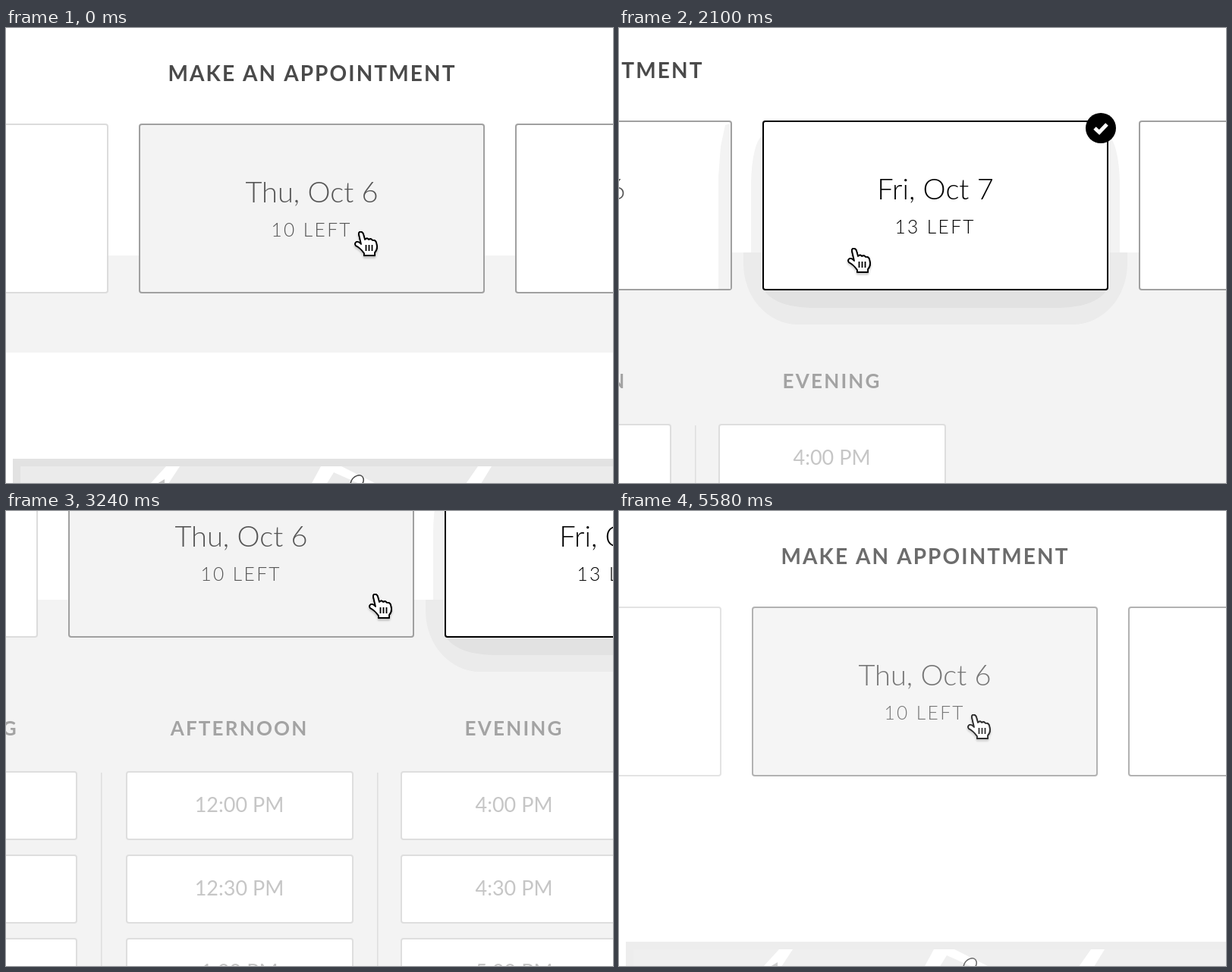
Write an HTML page with a canvas that moves like this. It is 800 px wide and 600 px high and loops after 5.64 s.

```html
<!DOCTYPE html>
<html lang="en">
<head>
<meta charset="utf-8">
<title>Make an appointment</title>
<style>
  html, body { margin: 0; width: 100%; height: 100%; overflow: hidden; background: #fff; }
  canvas { display: block; width: 800px; height: 600px; }
</style>
</head>
<body>
<canvas id="stage" width="800" height="600"></canvas>
<script>
const ctx = document.getElementById('stage').getContext('2d');
const LOOP = 5640, STEP = 60;
const CLICK = { open: 360, friday: 1560, thursday: 3420 };
const FADE_OUT = 4560, FADE_IN = 5280;

// Rows are time, x, y.
const CAMERA = [[540, 0, 0], [1260, 83, 0], [1860, 425, 0], [2100, 482, 4],
  [2580, 430, 37], [3240, 93, 183], [3900, 20.4, 213.5], [4620, 4, 226]];
const POINTER = [[420, 468, 269], [1260, 762, 295], [1500, 792, 295], [2640, 792, 295],
  [3240, 580, 293], [3420, 560, 292], [3900, 422, 423], [4320, 408, 570]];

const CARD = { y: 126, w: 456, h: 224 };
const COLUMNS = [
  { x: -113, title: 'MORNING', times: ['8:00 AM', '8:30 AM', '9:00 AM'] },
  { x: 251, title: 'AFTERNOON', times: ['12:00 PM', '12:30 PM', '1:00 PM'], open: [0, 2] },
  { x: 613, title: 'EVENING', times: ['4:00 PM', '4:30 PM', '5:00 PM'] }
];

const gray = n => { n = Math.round(n); return `rgb(${n},${n},${n})`; };
const clamp = v => Math.max(0, Math.min(1, v));
const mix = (a, b, p) => a + (b - a) * p;
const ramp = (t, start, length = 240) => clamp((t - start) / length);
const easeInOut = p => p < .5 ? 2 * p * p : 1 - 2 * (1 - p) * (1 - p);

// Monotone cubic interpolation of one column of a key table.
function curve(keys, col, t) {
  const last = keys.length - 1;
  if (t <= keys[0][0]) return keys[0][col];
  if (t >= keys[last][0]) return keys[last][col];
  const i = keys.findIndex(k => k[0] > t) - 1;
  const rate = j => (keys[j + 1][col] - keys[j][col]) / (keys[j + 1][0] - keys[j][0]);
  const slope = j => {
    if (j === 0 || j === last) return 0;
    const a = rate(j - 1), b = rate(j);
    return a * b > 0 ? 2 * a * b / (a + b) : 0;
  };
  const h = keys[i + 1][0] - keys[i][0], p = (t - keys[i][0]) / h;
  return mix(keys[i][col], keys[i + 1][col], p * p * (3 - 2 * p))
    + h * p * (1 - p) * ((1 - p) * slope(i) - p * slope(i + 1));
}

const inside = (p, x, y, w, h) => p.x >= x && p.x <= x + w && p.y >= y && p.y <= y + h;

function rect(x, y, w, h, fill) {
  ctx.fillStyle = fill;
  ctx.fillRect(x, y, w, h);
}

function rounded(x, y, w, h, r, fill) {
  ctx.beginPath();
  ctx.roundRect(x, y, w, h, r);
  ctx.fillStyle = fill;
  ctx.fill();
}

function box(x, y, w, h, fill, border) {
  rounded(x, y, w, h, 4, border);
  rounded(x + 2, y + 2, w - 4, h - 4, 2, fill);
}

function polygon(points, fill) {
  ctx.beginPath();
  points.forEach(([x, y]) => ctx.lineTo(x, y));
  ctx.closePath();
  ctx.fillStyle = fill;
  ctx.fill();
}

function label(text, x, y, size, color, weight = 400, tracking = 0) {
  ctx.font = `${weight} ${size}px Lato, sans-serif`;
  ctx.letterSpacing = tracking + 'px';
  ctx.textAlign = 'center';
  ctx.fillStyle = color;
  ctx.fillText(text, x + tracking / 2, y);
}

function clipped(y, h, draw) {
  ctx.save();
  ctx.beginPath();
  ctx.rect(-1000, y, 4000, h);
  ctx.clip();
  draw();
  ctx.restore();
}

function shadow(x, strength) {
  ctx.globalAlpha = strength;
  clipped(0, 300, () => rounded(x - 15, 146, 486, 300, { x: 17, y: 65 }, gray(243)));
  clipped(300, 300, () => {
    rounded(x - 25, 200, 506, 195, { x: 72, y: 80 }, gray(235));
    rounded(x, 250, 456, 123, { x: 64, y: 32 }, gray(226));
  });
  ctx.globalAlpha = 1;
}

function cardText(card, color) {
  const center = card.x + CARD.w / 2;
  label(card.day, center, 230, 38, color, 300);
  label(card.left, center - 1.5, 275, 24.5, color, 300, 2.4);
}

function drawCard(card, hover, selected) {
  box(card.x, CARD.y, CARD.w, CARD.h, gray(hover ? 243 : 255), gray(card.border));
  if (!card.day) return;
  if (card.edge > 0 && !hover) {
    ctx.globalAlpha = card.edge;
    polygon([[629, 130], [622, 132], [616, 160], [613, 200], [613, 348], [629, 348]], gray(243));
    ctx.globalAlpha = 1;
  }
  cardText(card, gray(86));
  if (selected <= 0) return;
  ctx.globalAlpha = selected;
  box(card.x, CARD.y, CARD.w, CARD.h, '#fff', '#000');
  cardText(card, '#000');
  const bx = card.x + 446, by = 136;
  ctx.beginPath();
  ctx.arc(bx, by, 20, 0, Math.PI * 2);
  ctx.fillStyle = '#000';
  ctx.fill();
  ctx.beginPath();
  ctx.moveTo(bx - 8, by);
  ctx.lineTo(bx - 2, by + 5.5);
  ctx.lineTo(bx + 8, by - 5);
  ctx.strokeStyle = '#fff';
  ctx.lineWidth = 5;
  ctx.stroke();
  ctx.globalAlpha = 1;
}

function drawTimes(pointer, availability) {
  let overButton = false;
  rect(218, 528, 1.5, 480, gray(222));
  rect(582, 528, 1.5, 480, gray(222));
  for (const column of COLUMNS) {
    const center = column.x + 150;
    label(column.title, center - 1.5, 479, 26, gray(163), 700, 2.2);
    column.times.forEach((time, row) => {
      const y = 526 + row * 110;
      const free = column.open && column.open.includes(row) ? availability : 0;
      const hover = free > .5 && inside(pointer, column.x, y, 300, 91);
      overButton = overButton || hover;
      box(column.x, y, 300, 91, gray(hover ? 243 : 255), gray(mix(222, 160, free)));
      label(time, center - .5, y + 54, 27, gray(mix(198, 96, free)));
    });
  }
  return overButton;
}

function drawMap(top, faded) {
  ctx.save();
  ctx.translate(0, top);
  rect(9, 0, 900, 400, gray(faded ? 233 : 226));
  rect(19, 10, 890, 390, gray(235));
  polygon([[211, 10], [229, 10], [214, 33], [190, 33]], '#fff');
  polygon([[209, 27], [209, 33], [199, 33]], gray(198));
  polygon([[415, 10], [442, 10], [490, 34], [468, 34], [432, 18], [422, 34], [402, 34]], '#fff');
  polygon([[622, 10], [640, 10], [626, 33], [606, 33]], '#fff');
  ctx.beginPath();
  ctx.moveTo(454, 33);
  ctx.bezierCurveTo(456, 22, 469, 18, 471, 26);
  ctx.quadraticCurveTo(472, 30, 469, 34);
  ctx.strokeStyle = gray(70);
  ctx.lineWidth = 1.5;
  ctx.stroke();
  ctx.restore();
}

const HAND = new Path2D('M6 4Q6 0 9 1Q11 1 12 4L14 11Q17 8 19 11Q22 9 24 12Q28 11 29 15'
  + 'L30 20Q30 25 27 28L27 32L13 32L13 29Q8 22 2 19Q0 16 3 14Q6 13 9 17Z');
const HAND_LINES = new Path2D('M15.5 18V26M19.5 18V26M23.5 18V26');
const ARROW = new Path2D('M1 1V27L7 21.5L11.5 32L15.5 30.5L11 20H18Z');

function drawPointer(p, hand) {
  ctx.save();
  ctx.translate(p.x - (hand ? 9 : 0), p.y - (hand ? 1 : 0));
  ctx.lineJoin = 'round';
  ctx.shadowColor = 'rgba(0,0,0,.35)';
  ctx.shadowBlur = 3;
  ctx.shadowOffsetY = 2;
  ctx.fillStyle = hand ? '#fff' : '#000';
  ctx.strokeStyle = hand ? '#000' : '#fff';
  ctx.lineWidth = hand ? 1.8 : 3.5;
  ctx.stroke(hand ? HAND : ARROW);
  ctx.shadowColor = 'transparent';
  ctx.fill(hand ? HAND : ARROW);
  if (hand) {
    ctx.stroke(HAND);
    ctx.stroke(HAND_LINES);
  }
  ctx.restore();
}

function drawScene(t, faded) {
  const toFriday = ramp(t, CLICK.friday), toThursday = ramp(t, CLICK.thursday);
  const thursday = ramp(t, CLICK.open) - toFriday + toThursday;
  const friday = toFriday - toThursday;
  const pointer = { x: curve(POINTER, 1, t), y: curve(POINTER, 2, t) };
  const panelBottom = 428 + 572 * easeInOut(ramp(t, CLICK.open, 480));
  const cards = [
    { x: -321, border: 220 },
    { x: 175, border: 160, day: 'Thu, Oct 6', left: '10 LEFT', selected: thursday, edge: friday },
    { x: 671, border: 160, day: 'Fri, Oct 7', left: '13 LEFT', selected: friday },
    { x: 1167, border: 160 }
  ];

  ctx.save();
  ctx.translate(-curve(CAMERA, 1, t), -curve(CAMERA, 2, t));
  if (!faded) rect(-1000, 300, 4000, panelBottom - 300, gray(243));
  drawMap(panelBottom + 140, faded);

  let hand = false;
  if (t >= CLICK.open) {
    clipped(300, panelBottom - 300, () => { hand = drawTimes(pointer, thursday); });
  }
  label('MAKE AN APPOINTMENT', 402.5, 70, 28, gray(74), 700, 2.1);
  for (const card of cards) if (card.selected > 0) shadow(card.x, card.selected);
  for (const card of cards) {
    const hover = inside(pointer, card.x, CARD.y, CARD.w, CARD.h);
    hand = hand || hover;
    drawCard(card, hover, card.selected || 0);
  }
  drawPointer(pointer, hand);
  ctx.restore();
}

function render(now) {
  const t = Math.floor((now % LOOP) / STEP) * STEP;
  const fadingIn = t >= FADE_IN;
  rect(0, 0, 800, 600, '#fff');
  drawScene(fadingIn ? 0 : t, fadingIn);
  let veil = 0;
  if (fadingIn) veil = 1 - ((t - FADE_IN) / STEP + 1) / 7.4;
  else if (t >= FADE_OUT) veil = clamp(((t - FADE_OUT) / STEP + 1) / 5);
  if (veil > 0) rect(0, 0, 800, 600, `rgba(255,255,255,${veil})`);
}

const start = performance.now();
function tick() {
  render(performance.now() - start);
  requestAnimationFrame(tick);
}
tick();
</script>
</body>
</html>
```
